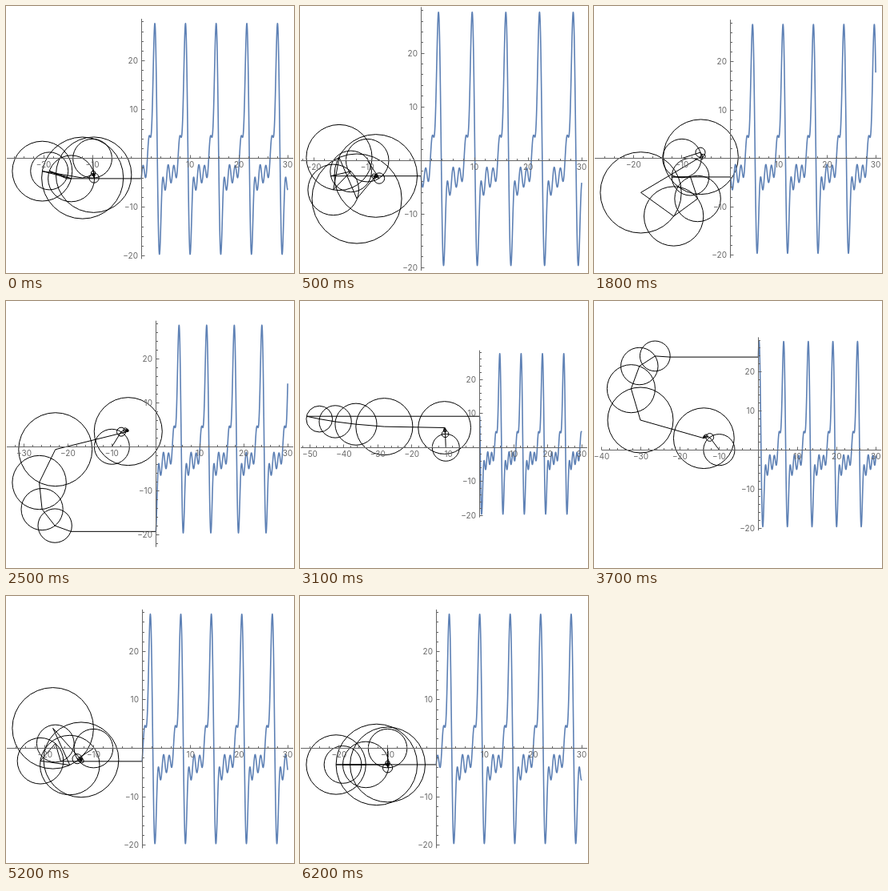
An HTML page with a canvas that plays this animation: 360 px wide and 334 px high, repeating every 6300 ms.

```html
<!DOCTYPE html>
<html lang="en">
<head>
<meta charset="utf-8">
<title>Fourier epicycles</title>
<style>
html, body { margin: 0; width: 100%; height: 100%; overflow: hidden; background: #fff; }
canvas { display: block; }
</style>
</head>
<body>
<canvas id="stage" width="360" height="334"></canvas>
<script>
const W = 360, H = 334, STEPS = 63, STEP_MS = 100, TERMS = 5, SPAN = 30, PAD = 0.02;
const ctx = document.getElementById('stage').getContext('2d');

// Series of t^2 (cosines) and -t^3 (sines) on (-pi, pi)
const cosCoef = [], sinCoef = [];
for (let n = 1; n <= TERMS; n++) {
  const sign = n % 2 ? -1 : 1;
  cosCoef.push(sign * 4 / n ** 2);
  sinCoef.push(sign * 2 * (Math.PI ** 2 / n - 6 / n ** 3));
}

const wave = t => cosCoef.reduce((sum, a, i) =>
  sum + a * Math.cos((i + 1) * t) + sinCoef[i] * Math.sin((i + 1) * t), 0);

let waveMin = 0, waveMax = 0;
for (let t = 0; t < 2 * Math.PI; t += 0.005) {
  waveMin = Math.min(waveMin, wave(t));
  waveMax = Math.max(waveMax, wave(t));
}

function epicycles(t) {
  let x = -10, y = 0;
  const circles = [], joints = [[x, y]];
  const add = (r, angle, shift) => {
    circles.push({ x, y, r: Math.abs(r) });
    x += shift + r * Math.cos(angle);
    y += r * Math.sin(angle);
    joints.push([x, y]);
  };
  cosCoef.forEach((a, i) => add(a, (i + 1) * t + Math.PI / 2, 0));
  sinCoef.forEach((b, i) => add(-b, -(i + 1) * t, i ? 0 : -10));
  joints.push([0, y]);
  return { circles, joints };
}

// Fit the data range, plus padding and outer label, into the stage
function fit(circles) {
  let x0 = Math.min(...circles.map(c => c.x - c.r)), x1 = SPAN;
  let y0 = Math.min(waveMin, ...circles.map(c => c.y - c.r));
  let y1 = Math.max(waveMax, ...circles.map(c => c.y + c.r));
  const px = (x1 - x0) * PAD, py = (y1 - y0) * PAD;
  x0 -= px; x1 += px; y0 -= py; y1 += py;
  const firstTick = Math.ceil((x0 - 0.2) / 10) * 10;
  let left = 1, scale;
  for (let i = 0; i < 3; i++) {
    scale = Math.min((W - 1 - left) / (x1 - x0), (H - 2) / (y1 - y0));
    left = Math.max(1, 9.5 - (firstTick - x0) * scale);
  }
  const right = W - 1;
  const ox = right - x1 * scale;
  const oy = H / 2 - 0.8 + (y0 + y1) / 2 * scale;
  return { x0, x1, y0, y1, scale, firstTick,
    X: x => ox + x * scale, Y: y => oy - y * scale };
}

function polyline(points, view) {
  ctx.beginPath();
  for (const [x, y] of points) ctx.lineTo(view.X(x), view.Y(y));
  ctx.stroke();
}

function drawAxes(v) {
  const snap = p => Math.floor(p) + 0.5;
  const ax = snap(v.X(0)), ay = snap(v.Y(0));
  const label = n => String(n).replace('-', '\u2212');
  ctx.strokeStyle = ctx.fillStyle = '#666';
  ctx.lineWidth = 1;
  ctx.font = '10px Inter, "Liberation Sans", sans-serif';
  ctx.textBaseline = 'alphabetic';
  ctx.beginPath();
  ctx.moveTo(v.X(v.x0), ay);
  ctx.lineTo(v.X(v.x1), ay);
  ctx.moveTo(ax, v.Y(v.y0));
  ctx.lineTo(ax, v.Y(v.y1));

  ctx.textAlign = 'center';
  for (let n = Math.min(v.firstTick, Math.ceil(v.x0 / 2) * 2); n <= v.x1; n += 2) {
    const major = n % 10 === 0, p = snap(v.X(n));
    ctx.moveTo(p, ay);
    ctx.lineTo(p, ay - (major ? 4 : 2.5));
    if (major && n) ctx.fillText(label(n), v.X(n), ay + 11.5);
  }
  ctx.textAlign = 'right';
  for (let n = Math.ceil(v.y0 / 2) * 2; n <= v.y1; n += 2) {
    const major = n % 10 === 0, p = snap(v.Y(n));
    ctx.moveTo(ax, p);
    ctx.lineTo(ax + (major ? 4 : 2.5), p);
    if (major && n) ctx.fillText(label(n), ax - 4.5, p + 3.5);
  }
  ctx.stroke();
}

function draw(t) {
  const { circles, joints } = epicycles(t);
  const view = fit(circles);
  ctx.fillStyle = '#fff';
  ctx.fillRect(0, 0, W, H);
  ctx.lineJoin = 'round';

  ctx.strokeStyle = '#000';
  ctx.lineWidth = 1;
  for (const c of circles) {
    ctx.beginPath();
    ctx.arc(view.X(c.x), view.Y(c.y), c.r * view.scale, 0, 2 * Math.PI);
    ctx.stroke();
  }
  polyline(joints, view);

  const curve = [];
  for (let i = 0; i <= 900; i++) {
    const x = i * SPAN / 900;
    curve.push([x, wave(t - x)]);
  }
  ctx.strokeStyle = '#5e81b5';
  ctx.lineWidth = 1.6;
  polyline(curve, view);

  drawAxes(view);
}

const start = performance.now();
let shown = -1;
function tick() {
  const step = Math.floor((performance.now() - start) / STEP_MS) % STEPS;
  if (step !== shown) {
    shown = step;
    // Steps of 0.1 that end on a full turn
    draw(2 * Math.PI - (STEPS - 1 - step) * 0.1);
  }
  requestAnimationFrame(tick);
}
tick();
</script>
</body>
</html>
```
